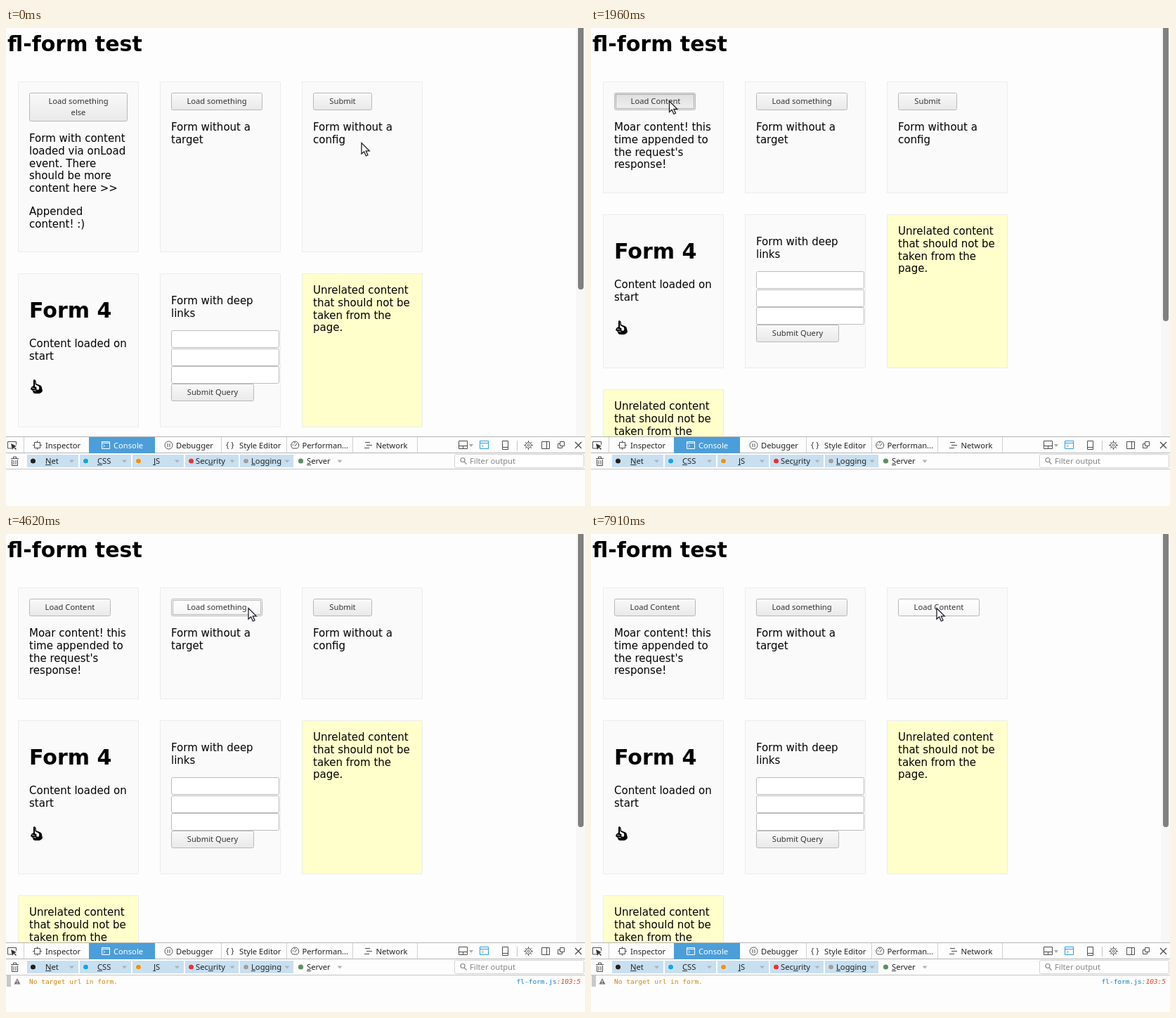
An HTML page with a canvas for the animation above (8 s loop, 824x680 px).

```html
<!DOCTYPE html>
<html lang="en">
<head>
<meta charset="utf-8">
<title>fl-form test</title>
<style>
html, body { margin: 0; width: 100%; height: 100%; overflow: hidden; background: #fdfdfd; }
canvas { display: block; }
</style>
</head>
<body>
<canvas id="stage" width="824" height="680"></canvas>
<script>
const c = document.getElementById('stage').getContext('2d');
const LOOP = 8000, TICK = 70;
const SANS = '"DejaVu Sans", sans-serif', UI = '"Noto Sans", sans-serif', MONO = '"DejaVu Sans Mono", monospace';
const BODY = '15px ' + SANS, BIG = 'bold 30px ' + SANS, SMALL = '11.2px ' + UI;
const UNRELATED = ['Unrelated content', 'that should not be', 'taken from the', 'page.'];
const MOAR = ['Moar content! this', 'time appended to', "the request's", 'response!'];

// Pointer waypoints: time, x, y
const POINTER = [
  [0, 506, 163], [70, 506, 163], [280, 470, 172], [560, 165, 126], [840, 103, 109],
  [1260, 103, 109], [1680, 111.5, 103.5], [3080, 111.5, 103.5], [3360, 383, 97.5],
  [3500, 383, 97.5], [3570, 382, 98], [3850, 345, 105], [5390, 345, 105],
  [5740, 501, 109], [5880, 494, 112], [6090, 494, 112], [6230, 494.5, 111],
  [6440, 494.5, 111], [6650, 492, 105], [LOOP, 492, 105]
];

function pointerAt(time) {
  const t = Math.floor(time / TICK) * TICK;
  const i = Math.max(1, POINTER.findIndex(p => p[0] >= t));
  const [t0, x0, y0] = POINTER[i - 1], [t1, x1, y1] = POINTER[i];
  const k = (t - t0) / (t1 - t0);
  return { x: x0 + (x1 - x0) * k, y: y0 + (y1 - y0) * k };
}

function text(str, x, y, font = BODY, color = '#000', align = 'left') {
  c.font = font;
  c.fillStyle = color;
  c.textAlign = align;
  c.fillText(str, x, y);
}

function lines(list, x, y) {
  list.forEach((s, i) => text(s, x, Math.round(y + i * 17.8)));
}

function rect(x, y, w, h, color) {
  c.fillStyle = color;
  c.fillRect(x, y, w, h);
}

function box(x, y, w, h, radius, fill, stroke) {
  c.beginPath();
  c.roundRect(x + .5, y + .5, w - 1, h - 1, radius);
  c.fillStyle = fill;
  c.fill();
  c.lineWidth = 1;
  c.strokeStyle = stroke;
  c.stroke();
}

function icon(d, color = '#4d4d4d', width = 1) {
  c.lineWidth = width;
  c.strokeStyle = color;
  c.stroke(new Path2D(d));
}

function shape(d, color) {
  c.fillStyle = color;
  c.fill(new Path2D(d));
}

function dot(x, y, r, color) {
  c.beginPath();
  c.arc(x, y, r, 0, 7);
  c.fillStyle = color;
  c.fill();
}

function card(x, y, h, fill = '#fafafa') {
  box(x, y, 172, h, 0, fill, '#ececec');
}

function button(x, y, w, label, mouse, pressed, focused = pressed) {
  const rows = label.split('\n'), h = 9 + 16 * rows.length;
  const hover = mouse.x >= x && mouse.x < x + w && mouse.y >= y && mouse.y < y + h;
  const [top, bottom] = pressed ? ['#dedede', '#f0f0f0'] : hover ? ['#ffffff', '#f5f5f5'] : ['#f9f9f9', '#e9e9e9'];
  const fill = c.createLinearGradient(0, y, 0, y + h);
  fill.addColorStop(0, top);
  fill.addColorStop(1, bottom);
  box(x, y, w, h, 2, fill, '#b8b8b8');
  if (focused) {
    c.setLineDash([1, 1]);
    c.strokeStyle = '#777';
    c.strokeRect(x + 2.5, y + 2.5, w - 5, h - 5);
    c.setLineDash([]);
  }
  rows.forEach((s, i) => text(s, x + w / 2 + (pressed ? 1 : 0), y + 16 + 16 * i, SMALL, '#333', 'center'));
}

function thumb(x, y) {
  c.save();
  c.translate(x, y);
  shape('M5 0C7 0 8 2 8 6L13 8Q16 9 16 12L17 16Q16 19 12 20L6 20Q3 19 3 16L0 14 1 11 4 9Q4 4 4 1Z', '#000');
  shape('M6 2Q7 4 6.5 7L12 10Q13 13 11 15L8 14Q10 11 6 10Z', '#fafafa');
  icon('M2 12L6 13M4 15.5L8 16', '#fafafa', .8);
  c.restore();
}

function page(t, mouse) {
  const first = t < 1120, another = t >= 2030 && t < 2660;
  const row2 = first ? 349 : another ? 281 : 265;

  rect(0, 0, 824, 581, '#fdfdfd');
  text('fl-form test', 2, 33, BIG);
  for (const x of [17, 219, 421]) card(x, 76, row2 - 106);

  const pressed1 = t >= 980 && t < 1120 || t >= 1820 && t < 2030 || t >= 2520 && t < 2660;
  if (first) {
    button(33, 92, 140, 'Load something\nelse', mouse, pressed1);
    lines(['Form with content', 'loaded via onLoad', 'event. There', 'should be more', 'content here >>'], 33, 162);
    lines(['Appended', 'content! :)'], 33, 266);
  } else {
    button(33, 92, another ? 140 : 116, another ? 'Load another\nform' : 'Load Content', mouse, pressed1);
    lines(MOAR, 33, another ? 162 : 146);
  }

  button(235, 92, 130, 'Load something', mouse, t >= 4410 && t < 4550, t >= 4410 && t < 6650);
  lines(['Form without a', 'target'], 235, 146);

  if (t < 6790) {
    button(437, 92, 84, 'Submit', mouse, t >= 6650);
    lines(['Form without a', 'config'], 437, 146);
  } else if (t >= 7140 && t < 7910) {
    button(437, 92, 141, 'Load another\nform', mouse, t >= 7770);
  } else {
    button(437, 92, 116, 'Load Content', mouse, t >= 6930 && t < 7140);
  }

  card(17, row2, 219);
  text('Form 4', 33, row2 + 63, BIG);
  lines(['Content loaded on', 'start'], 33, row2 + 105);
  thumb(35, row2 + 151);

  card(219, row2, 219);
  lines(['Form with deep', 'links'], 235, row2 + 44);
  for (const y of [81, 107, 132]) box(235, row2 + y, 154, 25, 2, '#fff', '#bcbcbc');
  button(235, row2 + 157, 118, 'Submit Query', mouse, false);

  card(421, row2, 219, '#ffffcc');
  lines(UNRELATED, 437, row2 + 29);
  card(17, row2 + 249, 219, '#ffffcc');
  lines(UNRELATED, 33, row2 + 278);

  rect(811, 0, 13, 581, '#f7f7f7');
  c.beginPath();
  c.roundRect(814, -8, 8, (first ? 372 : another ? 408 : 417) + 8, 4);
  c.fillStyle = '#808080';
  c.fill();
}

function filterButton(x, w, color, label, textX, caretX, key, on = true) {
  if (on) rect(x, 607, w, 18, '#c8dff0');
  dot(x + 8.5, 616, 4, '#fff');
  dot(x + 8.5, 616, 3.6, color);
  text(label, textX, 620, SMALL, '#222');
  const start = c.measureText(label.slice(0, key)).width, width = c.measureText(label[key]).width;
  rect(textX + start, 621, width, 1, '#333');
  shape(`M${caretX - 3.5} 614.5h7l-3.5 4z`, '#a9b4bd');
}

function tools(t) {
  rect(0, 581, 824, 99, '#fdfdfd');
  rect(0, 581, 824, 1, '#b5b5b5');
  rect(0, 604, 824, 1, '#b5b5b5');
  rect(0, 627, 824, 1, '#c4c4c4');
  for (const x of [25, 306, 399, 493, 585]) rect(x, 582, 1, 22, '#d0d0d0');
  rect(727, 587, 1, 14, '#c4c4c4');
  rect(118, 582, 94, 23, '#4c9ed9');

  icon('M9 598H2.5V588.5H14.5V593');
  shape('M7 591l8 4-3 1 3 3-1 1-3-3-2 3z', '#333');
  icon('M40.5 589.5h8v8h-8zM44.5 587v3M44.5 597v3M38 593.5h3M48 593.5h3');
  icon('M136.5 588.5h11v10h-11zM136 590.5h12M138.5 592.5l2 2-2 2', '#fff');
  icon('M237 593.5a5.5 5.5 0 1 1-11 0a5.5 5.5 0 1 1 11 0M230 591v5M233 591v5');
  icon('M408 598a5.5 5.5 0 1 1 6.5 0zM411 595l3-4M407.5 593h2M411 589v2');
  icon('M511 589.5h7M513 593.5h8M510 597.5h7');
  text('{ }', 313, 597, SMALL, '#333');
  const tabs = [['Inspector', 56], ['Console', 153], ['Debugger', 242], ['Style Editor', 332], ['Performan...', 421.5], ['Network', 526.5]];
  for (const [label, x] of tabs) text(label, x, 597.5, SMALL, label === 'Console' ? '#fff' : '#222');

  icon('M644.5 587.5h12v11h-12zM644 594.5h13M650.5 594v5');
  shape('M659 592h6l-3 4z', '#aaa');
  icon('M674.5 587.5h12v11h-12zM674 590.5h13M677 592.5l2 2-2 2', '#2b9be0');
  icon('M706.5 587.5h8v12h-8zM706 596.5h9');
  icon('M747.5 593.5a4 4 0 1 1-8 0a4 4 0 1 1 8 0M745 593.5a1.5 1.5 0 1 1-3 0a1.5 1.5 0 1 1 3 0M743.5 587v2.5M743.5 597.5v2.5M737 593.5h2.5M747.5 593.5h2.5M739 589l1.6 1.6M748 589l-1.6 1.6M739 598l1.6-1.6M748 598l-1.6-1.6', '#555');
  icon('M762.5 588.5h11v10h-11zM769.5 588v11');
  icon('M788.5 588.5h6v6h-6zM788 591.5h-2.5v6h6v-3');
  icon('M810 589l9 9M819 589l-9 9', '#444', 1.2);

  icon('M7 612.5h11M10.5 612v-2h4v2M8.5 614v8.5h8v-8.5M11 615v6M14 615v6');
  filterButton(30, 73, '#222', 'Net', 56, 93.5, 0);
  filterButton(105, 73, '#19a5e3', 'CSS', 130, 168.5, 0);
  filterButton(180, 73, '#e8961e', 'JS', 210, 243.5, 0);
  filterButton(255, 76, '#e5343b', 'Security', 270, 322, 3);
  filterButton(333, 76, '#a0a0a0', 'Logging', 349, 400, 0);
  filterButton(411, 70, '#5f8e62', 'Server', 428, 475, 0, false);

  box(638, 606, 185, 20, 2, '#fff', '#d0d0d0');
  icon('M653 614.5a3 3 0 1 1-6 0a3 3 0 1 1 6 0M652 617l3.5 3.5', '#888', 1.2);
  text('Filter output', 660, 620, SMALL, '#858585');

  if (t < 4620) return;
  rect(1, 628, 6, 16, '#c8c8c8');
  shape('M16 632l4.5 8.5h-9z', '#777');
  rect(15.5, 635, 1, 3, '#fff');
  rect(15.5, 639, 1, 1, '#fff');
  const mono = '9.5px ' + MONO;
  text('No target url in form.', 33, 640, mono, '#d58500');
  text('fl-form.js', 726.5, 640, mono, '#0a84c8');
  text(':103:5', 783.7, 640, 'italic ' + mono, '#e2401f');
}

function cursor({ x, y }) {
  c.save();
  c.translate(x, y);
  const arrow = 'M0 .5V16L3.6 12.8 6.4 19 9 17.8 6.3 11.9H11.2Z';
  shape(arrow, '#fff');
  icon(arrow, '#1c1c24', 1.3);
  c.restore();
}

function draw(now) {
  const t = now % LOOP, mouse = pointerAt(t);
  page(t, mouse);
  tools(t);
  cursor(mouse);
  requestAnimationFrame(draw);
}
requestAnimationFrame(draw);
</script>
</body>
</html>
```
